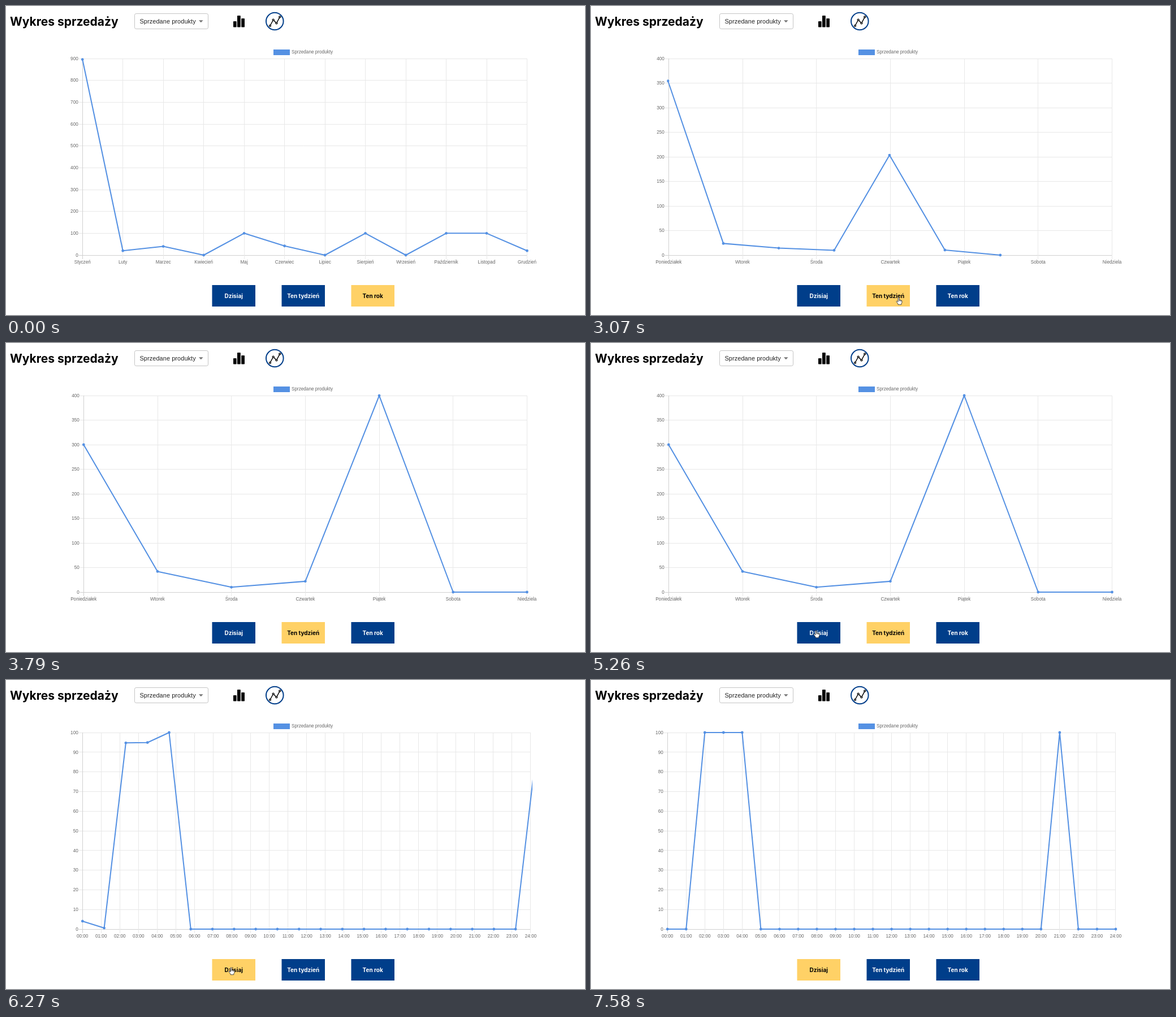
Write an HTML page with a canvas that moves like this. It is 1024 px wide and 547 px high and loops after 7.7 s.

```html
<!DOCTYPE html>
<html lang="pl">
<head>
<meta charset="utf-8">
<title>Wykres sprzedaży</title>
<style>
  html, body { margin: 0; width: 100%; height: 100%; overflow: hidden; background: #fff; }
  canvas { display: block; }
</style>
</head>
<body>
<canvas id="stage" width="1024" height="547"></canvas>
<script>
const ctx = document.getElementById('stage').getContext('2d');
const LOOP = 7700, MORPH = 959, TOP = 93, BASE = 441;
const BLUE = '#003e8a', YELLOW = '#ffd166', LINE = '#5591e3';
const SANS = '"Liberation Sans", Arial, sans-serif';
const HEAD = 'Inter, sans-serif';

const hours = Array.from({ length: 25 }, (_, i) => String(i).padStart(2, '0') + ':00');
const year = {
  left: 135.2, right: 921.5, max: 900, step: 100, button: 2,
  labels: 'Styczeń Luty Marzec Kwiecień Maj Czerwiec Lipiec Sierpień Wrzesień Październik Listopad Grudzień'.split(' '),
  data: [896, 20, 40, 0, 100, 42, 0, 100, 0, 100, 100, 20]
};
const week = {
  left: 137.3, right: 921.5, max: 400, step: 50, button: 1, start: 2939, shown: 2960, from: year,
  labels: 'Poniedziałek Wtorek Środa Czwartek Piątek Sobota Niedziela'.split(' '),
  data: [300, 42, 10, 22, 400, 0, 0]
};
const day = {
  left: 135.2, right: 928, max: 100, step: 10, button: 0, start: 5774, shown: 5780, from: week,
  labels: hours,
  data: hours.map((_, i) => [2, 3, 4, 21].includes(i) ? 100 : 0)
};
const buttons = [[364.5, 'Dzisiaj'], [487.5, 'Ten tydzień'], [610.5, 'Ten rok']];

// Pointer moves: start, end, hold until, from x/y, to x/y, easing
const easeOut = u => 1 - (1 - u) ** 2, easeIn = u => u * u;
const moves = [
  [2485, 2820, 3390, 566, 543, 544, 515.5, easeOut],
  [3390, 3480, 3480, 544, 515.5, 544, 525, easeIn],
  [4675, 5020, 5165, 421, 543, 399, 510, easeOut],
  [5165, 5260, 7195, 399, 510, 398, 508.5, easeOut],
  [7195, 7580, 7580, 398, 508.5, 401, 549, easeIn]
];
const arrow = new Path2D('M0 0V10.6L2.5 8.3L4.1 12L5.7 11.3L4.1 7.7H7.5Z');
const hand = new Path2D('M-1 1Q0 -.6 1 1V4.8Q2.2 4 2.8 5.2Q4 4.6 4.5 5.8Q6 5.3 6 7V9.5L4.8 11.5V13.2H-1V11.8L-3.8 8Q-4 6.6-2.6 6.8L-1 8.3Z');

function text(str, x, y, font, color, align = 'left', spacing = '0px') {
  ctx.font = font;
  ctx.fillStyle = color;
  ctx.textAlign = align;
  ctx.letterSpacing = spacing;
  ctx.fillText(str, x, y);
}

function stroke(points, color, width) {
  ctx.beginPath();
  points.forEach(([x, y]) => ctx.lineTo(x, y));
  ctx.strokeStyle = color;
  ctx.lineWidth = width;
  ctx.stroke();
}

function dot(x, y, r, fill) {
  ctx.beginPath();
  ctx.arc(x, y, r, 0, 2 * Math.PI);
  ctx.fillStyle = fill;
  ctx.fill();
}

function box(x, y, w, h, r, fill) {
  ctx.beginPath();
  ctx.roundRect(x, y, w, h, r);
  ctx.fillStyle = fill;
  ctx.fill();
}

const xAt = (c, i) => c.left + i * (c.right - c.left) / (c.labels.length - 1);
const yAt = (c, v) => BASE - v / c.max * (BASE - TOP);
const crisp = v => Math.floor(v) + .5;

function drawHeader() {
  text('Wykres sprzedaży', 7, 34.5, `700 21px ${HEAD}`, '#000');
  box(227.5, 13.5, 130, 27, 2.7, '#fff');
  ctx.strokeStyle = '#c4c4c4';
  ctx.lineWidth = 1;
  ctx.stroke();
  text('Sprzedane produkty', 236.5, 31, `10.9px ${SANS}`, 'rgba(0,0,0,.87)', 'left', '.1px');
  ctx.fillStyle = '#757575';
  ctx.fill(new Path2D('M341 25.2H348.6L344.8 29.2Z'));

  box(402, 27, 5.7, 10.5, .8, '#000');
  box(409, 17, 5.8, 20.5, .8, '#000');
  box(416.2, 22, 5.8, 15.5, .8, '#000');

  dot(475.3, 27, 15.3, '#fff');
  ctx.strokeStyle = BLUE;
  ctx.lineWidth = 2;
  ctx.stroke();
  const knots = [[467, 35], [472.7, 24.5], [478.4, 30.5], [484.3, 19.3]];
  stroke(knots, '#000', 1.5);
  for (const [x, y] of knots) {
    dot(x, y, 2.1, '#000');
    dot(x, y, .8, '#fff');
  }
}

function drawAxes(c) {
  const font = `8.16px ${SANS}`;
  box(473, 77, 29, 10, 0, LINE);
  text('Sprzedane produkty', 505, 84.4, font, '#666');
  for (let v = 0; v <= c.max; v += c.step) {
    const y = crisp(yAt(c, v));
    stroke([[c.left - 6.5, y], [c.right, y]], v ? '#e8e8e8' : '#d0d0d0', 1);
    text(v, c.left - 7.5, yAt(c, v) + 2.8, font, '#666', 'right');
  }
  c.labels.forEach((label, i) => {
    const x = crisp(xAt(c, i));
    stroke([[x, TOP], [x, BASE + 7]], i ? '#e8e8e8' : '#d0d0d0', 1);
    text(label, xAt(c, i), 456.2, font, '#666', 'center');
  });
}

function drawSeries(c, t) {
  const old = c.from;
  const rest = old ? (1 - Math.min(1, (t - c.start) / MORPH)) ** 4 : 0;
  const points = c.data.map((v, i) => {
    const x = xAt(c, i), y = yAt(c, v);
    if (!old) return [x, y];
    return [x + (xAt(old, i) - x) * rest, y + (yAt(old, old.data[i] || 0) - y) * rest];
  });
  ctx.save();
  ctx.beginPath();
  ctx.rect(c.left - 3, 0, c.right - c.left + 6, 547);
  ctx.clip();
  stroke(points, LINE, 2.05);
  points.forEach(([x, y]) => dot(x, y, 2.4, LINE));
  ctx.restore();
}

function drawButtons(active) {
  buttons.forEach(([x, label], i) => {
    box(x, 494, 76.5, 38, 0, i === active ? YELLOW : BLUE);
    text(label, x + 38.2, 516.5, `700 10px ${HEAD}`, i === active ? '#000' : '#fff', 'center');
  });
}

function drawPointer(t) {
  const move = moves.find(([start, , until]) => t >= start && t < until);
  if (!move) return;
  const [start, end, , x0, y0, x1, y1, ease] = move;
  const u = ease(Math.min(1, (t - start) / (end - start)));
  const x = x0 + (x1 - x0) * u, y = y0 + (y1 - y0) * u;
  const over = y < 532 && buttons.some(([left]) => x >= left && x <= left + 76.5);
  const shape = over ? hand : arrow;
  ctx.save();
  ctx.translate(x, y);
  ctx.fillStyle = '#fff';
  ctx.fill(shape);
  ctx.strokeStyle = '#222';
  ctx.lineWidth = .8;
  ctx.stroke(shape);
  if (over) ctx.stroke(new Path2D('M1 4.8V7M2.8 5.2V7.2M4.5 5.8V7.5'));
  ctx.restore();
}

function frame(now) {
  const t = now % LOOP;
  const chart = t >= day.shown ? day : t >= week.shown ? week : year;
  ctx.fillStyle = '#fff';
  ctx.fillRect(0, 0, 1024, 547);
  ctx.lineJoin = 'round';
  drawHeader();
  drawAxes(chart);
  drawSeries(chart, t);
  drawButtons(chart.button);
  drawPointer(t);
}

const origin = performance.now();
(function tick() {
  frame(performance.now() - origin);
  requestAnimationFrame(tick);
})();
</script>
</body>
</html>
```
